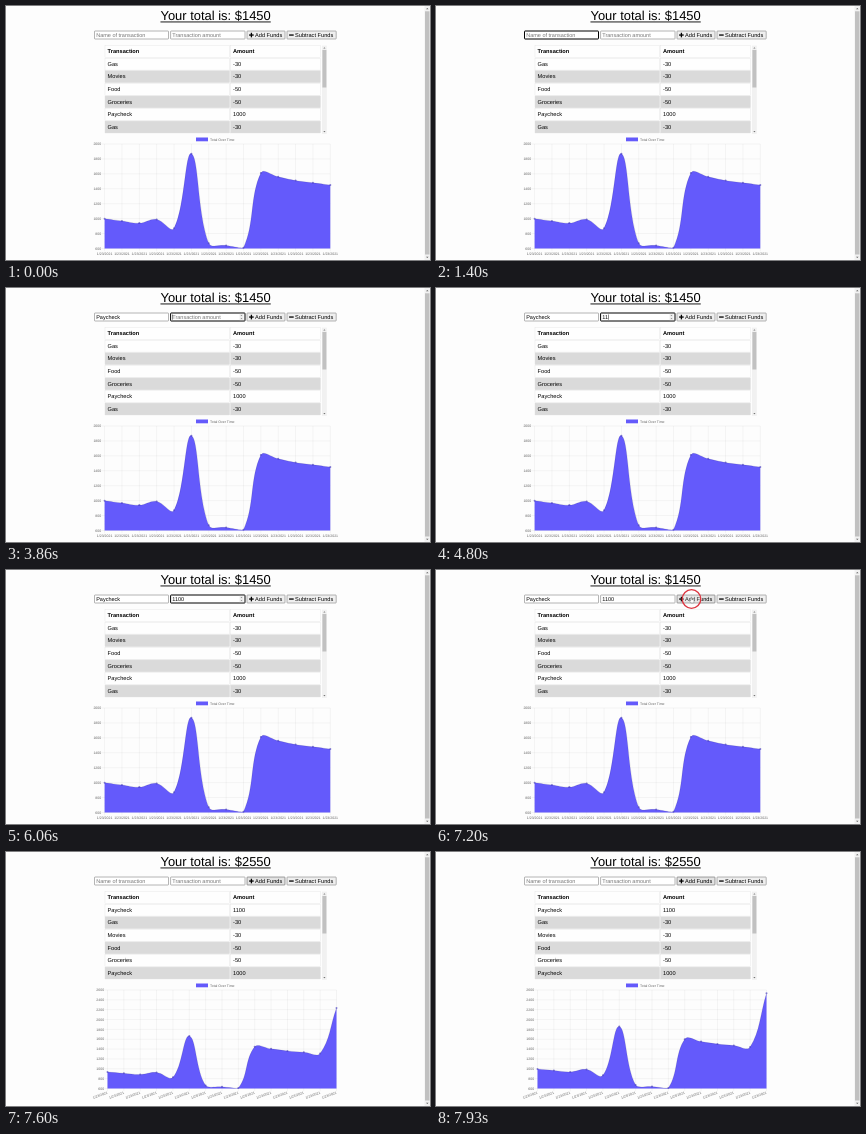
Write an HTML page that moves like this. It is 424 px wide and 254 px high and loops after 8 s.

```html
<!DOCTYPE html>
<html lang="en">
<head>
<meta charset="utf-8">
<title>Budget tracker</title>
<style>
html, body { margin: 0; width: 100%; height: 100%; overflow: hidden; background: #fdfdfd; }
svg { display: block; width: 424px; height: 254px; }
text { font-family: "Liberation Sans", Arial, sans-serif; font-size: 5.65px; text-rendering: geometricPrecision; }
.title { font-size: 12.95px; text-anchor: middle; }
.bold { font-weight: bold; }
.field { font-size: 5.5px; }
.tiny { font-size: 3.5px; fill: #666; }
.grid { stroke: #000; stroke-opacity: .1; stroke-width: .4; fill: none; }
</style>
</head>
<body>
<svg id="stage" viewBox="0 0 424 254"></svg>
<script>
const LOOP = 8000, FOCUS = 640, TAB = 3860, HOVER = 6330, PRESS = 7130, ADD = 7235, CLEAR = 7470;
const PURPLE = '#645afb';
const stage = document.getElementById('stage');

function el(tag, attrs, parent = stage, content) {
  const node = document.createElementNS('http://www.w3.org/2000/svg', tag);
  set(node, attrs);
  if (content !== undefined) node.textContent = content;
  parent.appendChild(node);
  return node;
}
function set(node, attrs) {
  for (const key in attrs) node.setAttribute(key, attrs[key]);
}
function show(node, on) {
  node.style.display = on ? '' : 'none';
}
function rect(x, y, width, height, fill, parent, extra) {
  return el('rect', { x, y, width, height, fill, ...extra }, parent);
}
function label(x, y, content, cls = '', parent, extra) {
  return el('text', { x, y, class: cls, ...extra }, parent, content);
}
function triangle(x, y, r, dir, fill, parent) {
  return el('path', { d: `M${x - r} ${y + dir * r / 2}h${2 * r}l${-r} ${-dir * r}z`, fill }, parent);
}

// Page scrollbar and heading
rect(418.5, 0, 5.5, 254, '#f1f1f1');
rect(419, 5.3, 4.5, 243.2, '#c1c1c1');
triangle(421.3, 2.6, 1.3, 1, '#606060');
triangle(421.3, 251.4, 1.3, -1, '#606060');
const title = label(209.6, 14.2, '', 'title');
const rule = rect(154, 15.5, 111, .9, '#000');

// Form
function field(x, width, hint) {
  const box = rect(x, 25, width, 8, '#fff', stage, { rx: .5 });
  const text = label(x + 1.7, 31, '', 'field');
  const caret = rect(0, 26.5, .45, 5.2, '#000');
  return { x, hint, box, text, caret };
}
const nameField = field(88.5, 74, 'Name of transaction');
const sumField = field(164.6, 74.4, 'Transaction amount');
const spinner = el('g', {});
rect(233.6, 25.9, 3.8, 6.2, '#ececec', spinner);
triangle(235.5, 27.6, .9, 1, '#555', spinner);
triangle(235.5, 30.4, .9, -1, '#555', spinner);

function button(x, width, caption, plus) {
  const box = rect(x, 25, width, 8, '#efefef', stage, { rx: .6, stroke: '#767676', 'stroke-width': .55 });
  rect(x + 2.1, 28.4, 4.6, 1.3, '#000');
  if (plus) rect(x + 3.75, 26.75, 1.3, 4.6, '#000');
  label(x + 8, 31, caption);
  return box;
}
const addButton = button(241, 38, 'Add Funds', true);
button(281, 49.2, 'Subtract Funds', false);

// Table
const ROWS = [['Paycheck', 1100], ['Gas', -30], ['Movies', -30], ['Food', -50],
  ['Groceries', -50], ['Paycheck', 1000], ['Gas', -30]];
const cells = [];
for (let i = 0; i < 7; i++) {
  const y = 39.6 + 12.58 * i, fill = i && i % 2 === 0 ? '#dadada' : '#fefefe';
  const edge = { stroke: '#dedede', 'stroke-width': .35 };
  rect(99, y, 124.6, 11.9, fill, stage, edge);
  rect(224.5, y, 90, 11.9, fill, stage, edge);
  const cls = i ? '' : 'bold';
  cells.push([label(101.6, y + 7.6, 'Transaction', cls), label(227, y + 7.6, 'Amount', cls)]);
}
rect(316, 39.6, 4.8, 88.2, '#f1f1f1');
rect(316.4, 44, 4, 37.5, '#c1c1c1');
triangle(318.4, 41.9, 1.1, 1, '#777');
triangle(318.4, 125.7, 1.1, -1, '#444');

// Chart
const TOTALS = [1000, 970, 940, 990, 870, 1870, 670, 640, 610, 1610, 1560, 1510, 1480, 1450];
rect(190, 131.5, 12, 3.8, PURPLE);
label(204, 134.6, 'Total Over Time', 'tiny');

function makeChart({ left, right, bottom, max, totals, tilt }) {
  const top = 138, g = el('g', {}), step = (right - left) / (totals.length - 1);
  const unit = (bottom - top) / (max - 600);
  let lines = '';
  for (let v = 600; v <= max; v += 200) {
    const y = bottom - (v - 600) * unit;
    lines += `M${left - 2.8} ${y}H${right}`;
    label(left - 3.4, y + 1.2, v, 'tiny', g, { 'text-anchor': 'end' });
  }
  const pts = totals.map((v, i) => ({ x: left + i * step, y: bottom - (v - 600) * unit }));
  for (const { x } of pts) {
    lines += `M${x} ${top}V${bottom + 2.8}`;
    const extra = tilt
      ? { 'text-anchor': 'end', transform: `rotate(${-tilt} ${x} ${bottom + 4})` }
      : { 'text-anchor': 'middle' };
    label(x, bottom + (tilt ? 5.2 : 6.6), '1/23/2021', 'tiny', g, extra);
  }
  el('path', { d: lines, class: 'grid' }, g);

  // Cubic handles with tension 0.4, kept inside the plot area
  const cap = p => ({ x: Math.min(right, Math.max(left, p.x)), y: Math.min(bottom, Math.max(top, p.y)) });
  pts.forEach((p, i) => {
    const a = pts[i - 1] || p, b = pts[i + 1] || p;
    const da = Math.hypot(p.x - a.x, p.y - a.y), db = Math.hypot(b.x - p.x, b.y - p.y);
    const fa = .4 * da / (da + db), fb = .4 * db / (da + db);
    p.before = cap({ x: p.x - fa * (b.x - a.x), y: p.y - fa * (b.y - a.y) });
    p.after = cap({ x: p.x + fb * (b.x - a.x), y: p.y + fb * (b.y - a.y) });
  });
  const area = el('path', { fill: PURPLE }, g);
  const line = el('path', { fill: 'none', stroke: '#000', 'stroke-opacity': .12, 'stroke-width': .8 }, g);
  const dots = pts.map(p => el('circle', { cx: p.x, r: 1, fill: '#4a40c0', 'fill-opacity': .65 }, g));

  function grow(k) {
    const sy = y => bottom + (y - bottom) * k;
    const at = p => `${p.x} ${sy(p.y).toFixed(2)}`;
    let d = `M${at(pts[0])}`;
    for (let i = 1; i < pts.length; i++) d += `C${at(pts[i - 1].after)} ${at(pts[i].before)} ${at(pts[i])}`;
    set(line, { d });
    set(area, { d: `${d}V${bottom}H${left}Z` });
    dots.forEach((dot, i) => set(dot, { cy: sy(pts[i].y) }));
  }
  grow(1);
  return { g, grow };
}
const before = makeChart({ left: 98.6, right: 324.3, bottom: 242.5, max: 2000, totals: TOTALS });
const after = makeChart({ left: 101.5, right: 330.5, bottom: 236.5, max: 2600, totals: [...TOTALS, 2550], tilt: 20 });

// Pointer
const hand = el('path', {
  d: 'M-.6 0q.6-.7 1.1 0v1.8l2 .6q.5.2.4.9l-.5 2h-2.8l-1.7-2.2q0-.7.8-.4l.7.4z',
  fill: '#fff', stroke: '#333', 'stroke-width': .4
});
const ring = el('circle', { cx: 255.5, cy: 29, r: 9.3, fill: '#fff', 'fill-opacity': .15, stroke: '#dc3540', 'stroke-width': 1.3 });

const NAME_KEYS = [2060, 2260, 2400, 2600, 2800, 3060, 3260, 3460];
const SUM_KEYS = [4400, 4630, 4960, 5160];

function drawField(f, t, word, keys, from, to) {
  const typed = t < CLEAR ? keys.filter(k => k <= t) : [];
  const focused = t >= from && t < to;
  f.text.textContent = word.slice(0, typed.length) || f.hint;
  set(f.text, { fill: typed.length ? '#000' : '#757575' });
  set(f.box, { stroke: focused ? '#000' : '#767676', 'stroke-width': focused ? 1 : .55 });
  const last = typed.length ? typed[typed.length - 1] : from;
  show(f.caret, focused && (t - last) % 1000 < 500);
  set(f.caret, { x: f.x + 1.7 + (typed.length ? f.text.getComputedTextLength() : 0) });
}

let wasAdded;
function drawTotal(added) {
  if (added === wasAdded) return;
  wasAdded = added;
  title.textContent = 'Your total is: $' + (added ? 2550 : 1450);
  const width = title.getComputedTextLength();
  set(rule, { x: 209.6 - width / 2, width });
  for (let i = 1; i < 7; i++) {
    const row = ROWS[i - (added ? 1 : 0)];
    cells[i].forEach((cell, c) => { cell.textContent = row[c]; });
  }
  show(before.g, !added);
  show(after.g, added);
}

function draw(t) {
  const added = t >= ADD;
  drawTotal(added);
  if (added) after.grow(1 - (1 - Math.min(1, (t - ADD) / 1000)) ** 4);
  drawField(nameField, t, 'Paycheck', NAME_KEYS, FOCUS, TAB);
  drawField(sumField, t, '1100', SUM_KEYS, TAB, PRESS);
  show(spinner, t >= TAB && t < PRESS);

  const hover = t >= HOVER;
  set(addButton, {
    fill: hover ? '#e3e3e3' : '#efefef',
    stroke: t >= PRESS ? '#555' : '#767676'
  });
  show(hand, hover && t < CLEAR);
  set(hand, { transform: 'translate(255.3 27.6)' });
  show(ring, t >= PRESS && t < ADD);
}

const start = performance.now();
function tick() {
  draw((performance.now() - start) % LOOP);
  requestAnimationFrame(tick);
}
tick();
</script>
</body>
</html>
```
